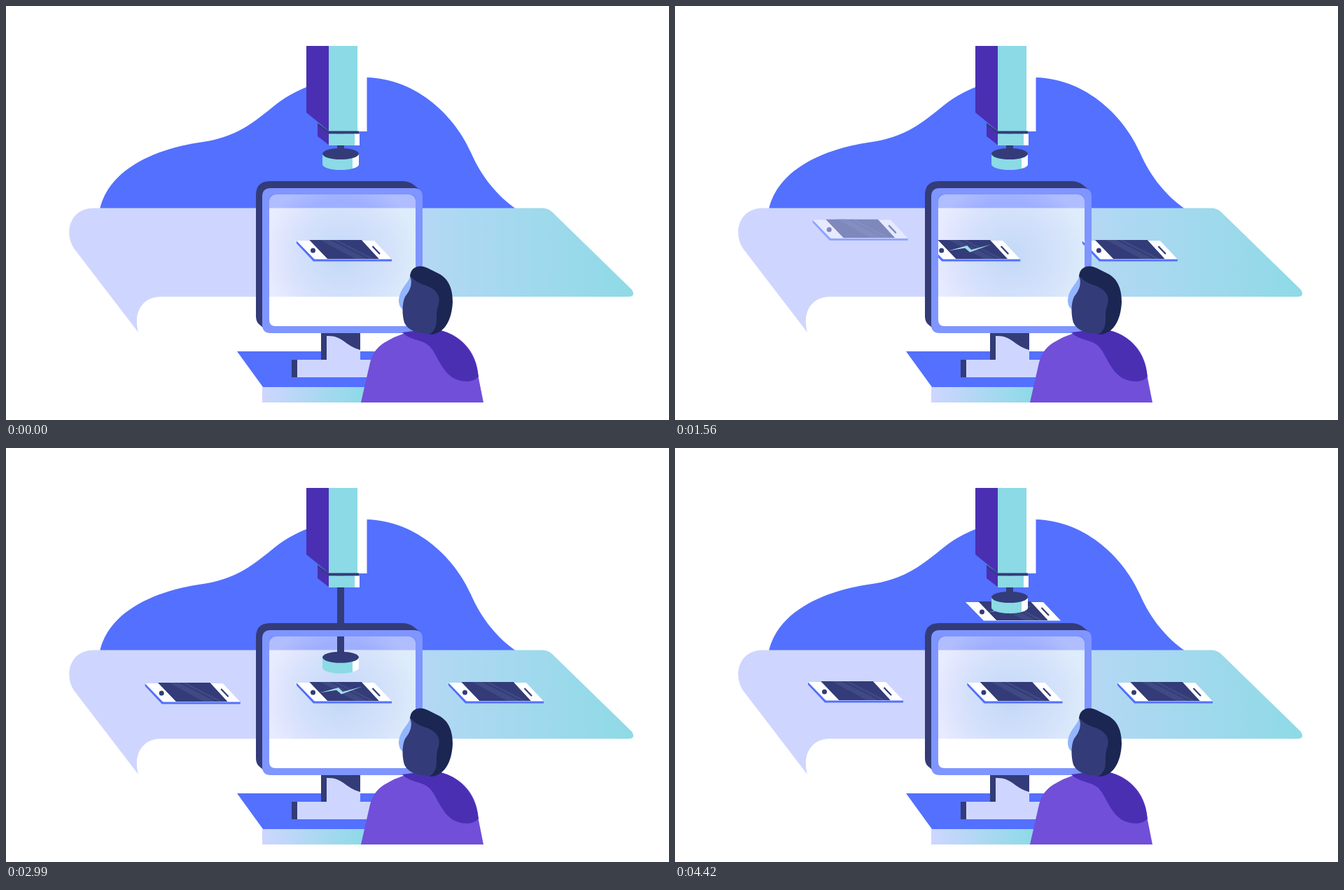
An HTML page for the animation above (4.55 s loop, 947 by 591 pixels).

```html
<!DOCTYPE html>
<html lang="en">
<head>
<meta charset="utf-8">
<title>Inspection line</title>
<style>
  html, body { margin: 0; width: 100%; height: 100%; overflow: hidden; background: #fff; }
  svg { display: block; width: 947px; height: 591px; }
  .blue { fill: #5370ff; }
  .navy { fill: #333c78; }
  .teal { fill: #8bdae6; }
  .pale { fill: #ced6ff; }
  .violet { fill: #4a2fb3; }
  .white { fill: #fff; }
</style>
</head>
<body>
<svg viewBox="0 0 947 591">
  <defs>
    <linearGradient id="beltFill" gradientUnits="userSpaceOnUse" x1="385" y1="0" x2="890" y2="0">
      <stop stop-color="#ced6ff"/><stop offset="1" stop-color="#8fdae6"/>
    </linearGradient>
    <linearGradient id="deskFill">
      <stop stop-color="#ced6ff"/><stop offset="1" stop-color="#8bdae6"/>
    </linearGradient>
    <radialGradient id="glass" gradientUnits="userSpaceOnUse" cx="478" cy="357" r="112">
      <stop offset=".7" stop-color="#fff" stop-opacity=".44"/>
      <stop offset="1" stop-color="#fff" stop-opacity=".54"/>
    </radialGradient>
    <radialGradient id="glow" gradientUnits="userSpaceOnUse" cx="478" cy="357" r="108">
      <stop stop-color="#bfd7f7" stop-opacity=".95"/>
      <stop offset=".55" stop-color="#cddcfa" stop-opacity=".65"/>
      <stop offset="1" stop-color="#dcdcfb" stop-opacity="0"/>
    </radialGradient>
    <clipPath id="screenClip"><path d="M433 0H508L533 27H459Z"/></clipPath>
    <g id="phone" transform="translate(-415)">
      <path fill="#5370ff" d="M415 1L440 27H551V30.500H439L415 5Z"/>
      <path class="white" d="M415 1H526L551 27.500H441Z"/>
      <g clip-path="url(#screenClip)">
        <path class="navy" d="M433 0H508L533 27H459Z"/>
        <path fill="#3f4983" d="M449 0H463L516 27H499ZM468 0H473L526 27H520Z"/>
      </g>
      <circle class="navy" cx="438.500" cy="15" r="3.500"/>
      <path d="M523.500 9L534 20" stroke="#333c78" stroke-width="2.200"/>
    </g>
    <path id="crack" fill="#a5dcea" d="M33 15.500L60 8L66 14L94 6.500L64 17.500L57 11.500Z"/>
  </defs>

  <path class="blue" d="M134 290C147 232 215 204 275 195C330 188 355 165 385 141C420 114 460 102 515 102C590 104 643 161 664 209C680 246 705 274 729 290Z"/>
  <path fill="url(#beltFill)" d="M125 288.500H766Q774 288.500 780 294L894 405Q900 415 889 415H221C196 415 181 436 189 466L97 346C82 323 92 288.500 125 288.500Z"/>

  <rect x="376" y="269" width="209" height="188" rx="9" fill="url(#glass)"/>
  <rect x="376" y="288.500" width="209" height="126.500" fill="url(#glow)"/>

  <g id="good"><use href="#phone"/></g>
  <g id="next"><use href="#phone"/></g>
  <g id="last"><use href="#phone"/></g>
  <g id="broken"><use href="#phone"/><use href="#crack"/></g>
  <rect id="marker" x="449" y="325" width="57" height="48" fill="none" stroke="#c678dc" stroke-width="2"/>

  <g id="puck">
    <rect class="navy" x="473" y="91" width="10" height="120"/>
    <path class="teal" d="M452 211V226A26 8 0 0 0 504 226V211Z"/>
    <path class="white" d="M495 211V232Q504 229.500 504 226V211Z"/>
    <ellipse class="navy" cx="478" cy="211" rx="26" ry="8"/>
  </g>

  <path class="blue" d="M330 493H530V544H367Z"/>
  <rect x="366" y="544" width="150" height="22" fill="url(#deskFill)"/>
  <path class="navy" d="M450 465H506V505H450ZM408 505H418V530H408Z"/>
  <path class="pale" d="M458 471C481 470 484 485 506 491V505H530V530H416V505H458Z"/>
  <path class="navy" fill-rule="evenodd" d="M377 250H566Q575 250 582 255L592 263V464H373L361 454Q357 450 357 443V270Q357 250 377 250ZM371 265V462H590V265Z"/>
  <path fill="#7f95ff" fill-rule="evenodd" d="M378 260H583Q595 260 595 272V455Q595 467 583 467H378Q366 467 366 455V272Q366 260 378 260ZM385 269Q376 269 376 278V448Q376 457 385 457H576Q585 457 585 448V278Q585 269 576 269Z"/>

  <path class="violet" d="M429 57H462V179L429 152Z"/>
  <rect class="teal" x="461" y="57" width="41" height="122"/>
  <rect class="white" x="502" y="57" width="13.500" height="122"/>
  <path class="violet" d="M445 168L462 181V199L445 186Z"/>
  <path class="navy" d="M445 167L461 178.500H504V182.500H461L445 170Z"/>
  <rect class="teal" x="461" y="182.500" width="38" height="16.500"/>
  <rect class="white" x="498" y="182.500" width="7" height="16.500"/>

  <path fill="#714fd9" d="M507 566L520 509Q525 488 545 478Q565 466 590 463H620C652 470 673 497 674 526L682 566Z"/>
  <path class="violet" d="M566 466C580 480 599 474 610 492C623 514 630 536 660 536Q670 535 675 529C671 495 652 472 621 463H590Z"/>
  <path fill="#93b5ff" d="M577 386C575 396 561 404 561 422Q562 432 569 434L580 400Z"/>
  <path fill="#1b2653" d="M577 386C578 373 589 368 602 374L618 382C634 390 638 407 638 422C637 450 625 469 605 469L590 440L596 404Z"/>
  <path class="navy" d="M577 386C581 396 578 405 570 415C565 426 566 442 569 452C575 465 592 468 606 468C621 457 611 441 618 426C622 410 610 403 600 399Q586 395 577 386Z"/>
</svg>
<script>
const LOOP = 4550, STEP = 130;
const el = id => document.getElementById(id);
const progress = (t, start, end) => Math.min(1, Math.max(0, (t - start) / (end - start)));
const sine = u => (1 - Math.cos(Math.PI * u)) / 2;
const glide = (t, start, end) => sine(progress(t, start, end));

function place(id, x, y, opacity = 1) {
  el(id).setAttribute("transform", `translate(${x} ${y})`);
  el(id).setAttribute("opacity", opacity);
}

function draw(t) {
  const lift = 115 * glide(t, 3234, 4180);

  place("good", 415 + 217 * progress(t, 778, 1795), 334);

  const drop = progress(t, 110, 750);
  place("broken", 194 - 4 * drop + 225 * glide(t, 778, 1960),
    286 + 48 * drop - lift, progress(t, 110, 410));

  place("next", 196.5 + 2.5 * progress(t, 1410, 3250) + 218.5 * glide(t, 3420, 4430),
    284 + 51 * progress(t, 1410, 1790) - glide(t, 3250, 4430), progress(t, 1410, 1710));

  place("last", 190, 284 + 49 * progress(t, 4010, 4390), progress(t, 4010, 4310));

  place("puck", 0, 117 * glide(t, 2650, 3160) - lift);
  el("marker").setAttribute("opacity", progress(t, 2020, 2280) - progress(t, 2340, 2600));
}

function tick(now) {
  draw(Math.floor(now % LOOP / STEP) * STEP);
  requestAnimationFrame(tick);
}
draw(0);
requestAnimationFrame(tick);
</script>
</body>
</html>
```
